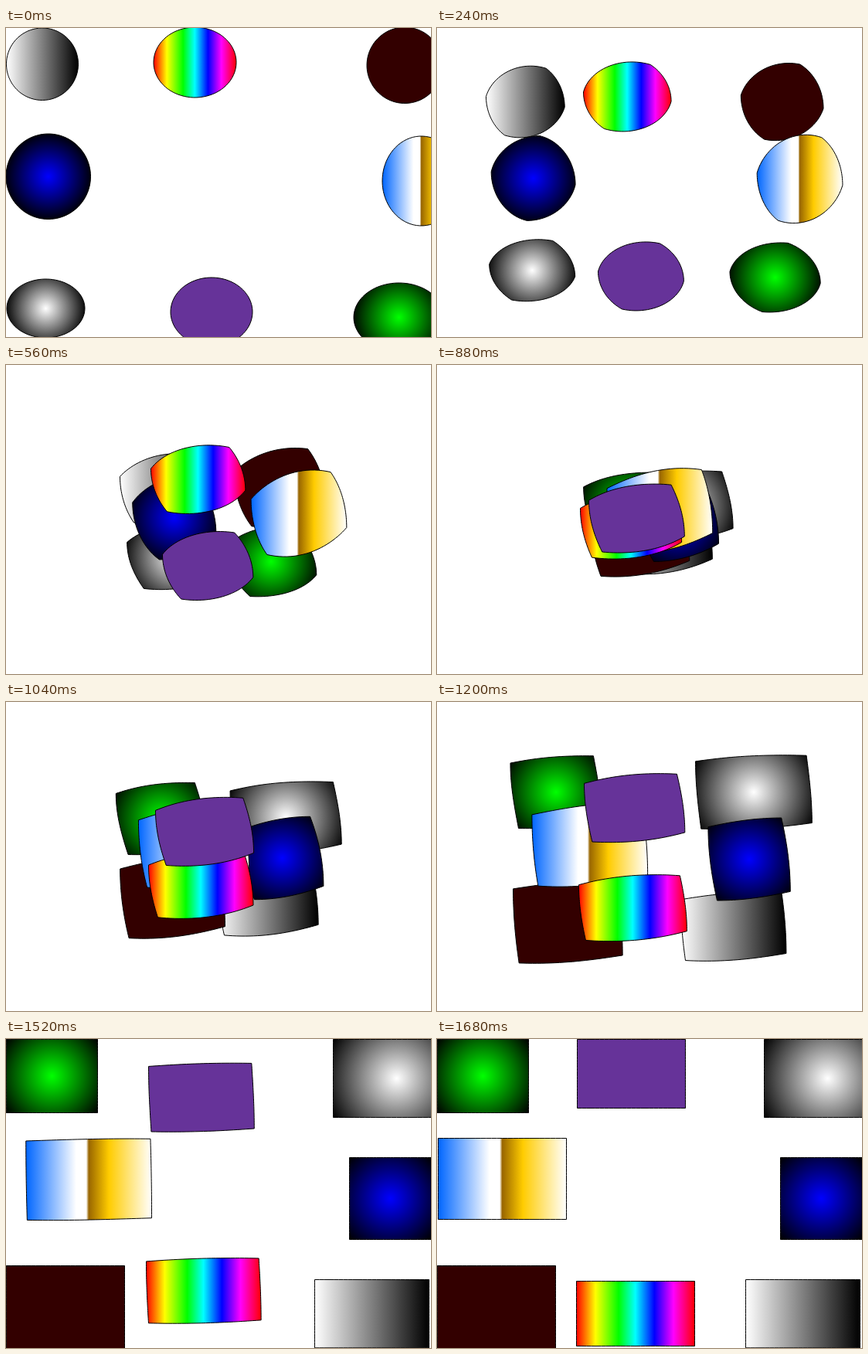
Recreate the animation shown at these times as an HTML page with a canvas. Size 550 by 400 pixels, loop 1760 ms.

```html
<!DOCTYPE html>
<html lang="en">
<head>
<meta charset="utf-8">
<title>Ovals to boxes</title>
<style>
  html, body { margin: 0; width: 100%; height: 100%; overflow: hidden; background: #fff; }
  canvas { display: block; }
</style>
</head>
<body>
<canvas id="stage" width="550" height="400"></canvas>
<script>
const ctx = document.getElementById('stage').getContext('2d');
const STEP = 80, STEPS = 22, EDGE_POINTS = 24;

const GRAY = [[0, '#fff'], [1, '#000']];
const RAINBOW = [[0, '#f00'], [.161, '#ff0'], [.357, '#0f0'], [.498, '#0ff'],
                 [.659, '#00f'], [.82, '#f0f'], [1, '#f00']];
const CHROME = [[0, '#06f'], [.4, '#fff'], [.48, '#fff'], [.5, '#960'],
                [.66, '#fc0'], [1, '#fff']];
const glow = color => [[0, color], [1, '#000']];

// Back to front; oval and box are [left, top, right, bottom], steps is the tween length.
const shapes = [
  { oval: [0.5, 0, 93.5, 93.5], box: [399.5, 311.5, 547.5, 399.8], steps: 19, linear: GRAY },
  { oval: [1, 325, 102, 401], box: [423.5, 0.5, 587.5, 101.5], steps: 19, radial: glow('#fff') },
  { oval: [467, -1, 565, 97.5], box: [0.3, 293.5, 153.5, 402.5], steps: 19, flat: '#300' },
  { oval: [450, 330, 567, 419], box: [0.3, 0.3, 118.5, 95.5], steps: 19, radial: glow('#0f0') },
  { oval: [0, 137, 109.5, 247.5], box: [444.5, 153.5, 550, 259.5], steps: 19, radial: glow('#00f') },
  { oval: [487, 140, 588, 256], box: [1.5, 128.5, 167.5, 233.5], steps: 20, linear: CHROME },
  { oval: [191, -1, 298, 90], box: [180.5, 313.5, 333.5, 397.5], steps: 21, linear: RAINBOW },
  { oval: [213, 323, 319, 412], box: [181.5, 0.5, 321.5, 89.5], steps: 21, flat: '#639' }
];

const mix = (a, b, p) => a + (b - a) * p;

function measure([l, t, r, b]) {
  return { cx: (l + r) / 2, cy: (t + b) / 2, rx: (r - l) / 2, ry: (b - t) / 2 };
}

// Point on the oval at a share of its outline, clockwise from the left.
function ovalPoint({ cx, cy, rx, ry }, share) {
  const u = Math.PI * (1 + 2 * share);
  const skew = (rx * rx - ry * ry) / (4 * (rx * rx + ry * ry));
  const a = u + skew * Math.sin(2 * u);
  return [cx + rx * Math.cos(a), cy + ry * Math.sin(a)];
}

// Pairs of matching outline points, spaced by length from the box's top left corner.
function matchOutlines({ oval, box }) {
  const [l, t, r, b] = box;
  const corners = [[l, t], [r, t], [r, b], [l, b]];
  const m = measure(oval);
  const wide = (r - l) / (2 * (r - l + b - t));
  const starts = [0, wide, .5, .5 + wide, 1];
  const pairs = [];
  corners.forEach((c, i) => {
    const next = corners[(i + 1) % 4];
    for (let j = 0; j < EDGE_POINTS; j++) {
      const q = j / EDGE_POINTS;
      pairs.push([ovalPoint(m, mix(starts[i], starts[i + 1], q)),
                  [mix(c[0], next[0], q), mix(c[1], next[1], q)]]);
    }
  });
  return pairs;
}

function fillFor(shape, p) {
  if (shape.flat) return shape.flat;
  const { cx, cy, rx } = measure(shape.oval.map((v, i) => mix(v, shape.box[i], p)));
  let fill;
  if (shape.linear) {
    fill = ctx.createLinearGradient(cx - rx, 0, cx + rx, 0);
  } else {
    const from = measure(shape.oval), to = measure(shape.box);
    const radius = mix(Math.max(from.rx, from.ry) * 1.05, Math.hypot(to.rx, to.ry), p);
    fill = ctx.createRadialGradient(cx, cy, 0, cx, cy, radius);
  }
  (shape.linear || shape.radial).forEach(([at, color]) => fill.addColorStop(at, color));
  return fill;
}

function drawShape(shape, step) {
  const p = Math.min(1, step / shape.steps);
  ctx.beginPath();
  shape.pairs.forEach(([a, b]) => ctx.lineTo(mix(a[0], b[0], p), mix(a[1], b[1], p)));
  ctx.closePath();
  ctx.fillStyle = fillFor(shape, p);
  ctx.fill();
  ctx.stroke();
}

shapes.forEach(s => { s.pairs = matchOutlines(s); });
ctx.strokeStyle = '#000';
ctx.lineWidth = 1;
const begin = performance.now();

function draw() {
  const step = Math.floor((performance.now() - begin) / STEP) % STEPS;
  ctx.fillStyle = '#fff';
  ctx.fillRect(0, 0, 550, 400);
  shapes.forEach(s => drawShape(s, step));
  requestAnimationFrame(draw);
}
draw();
</script>
</body>
</html>
```
